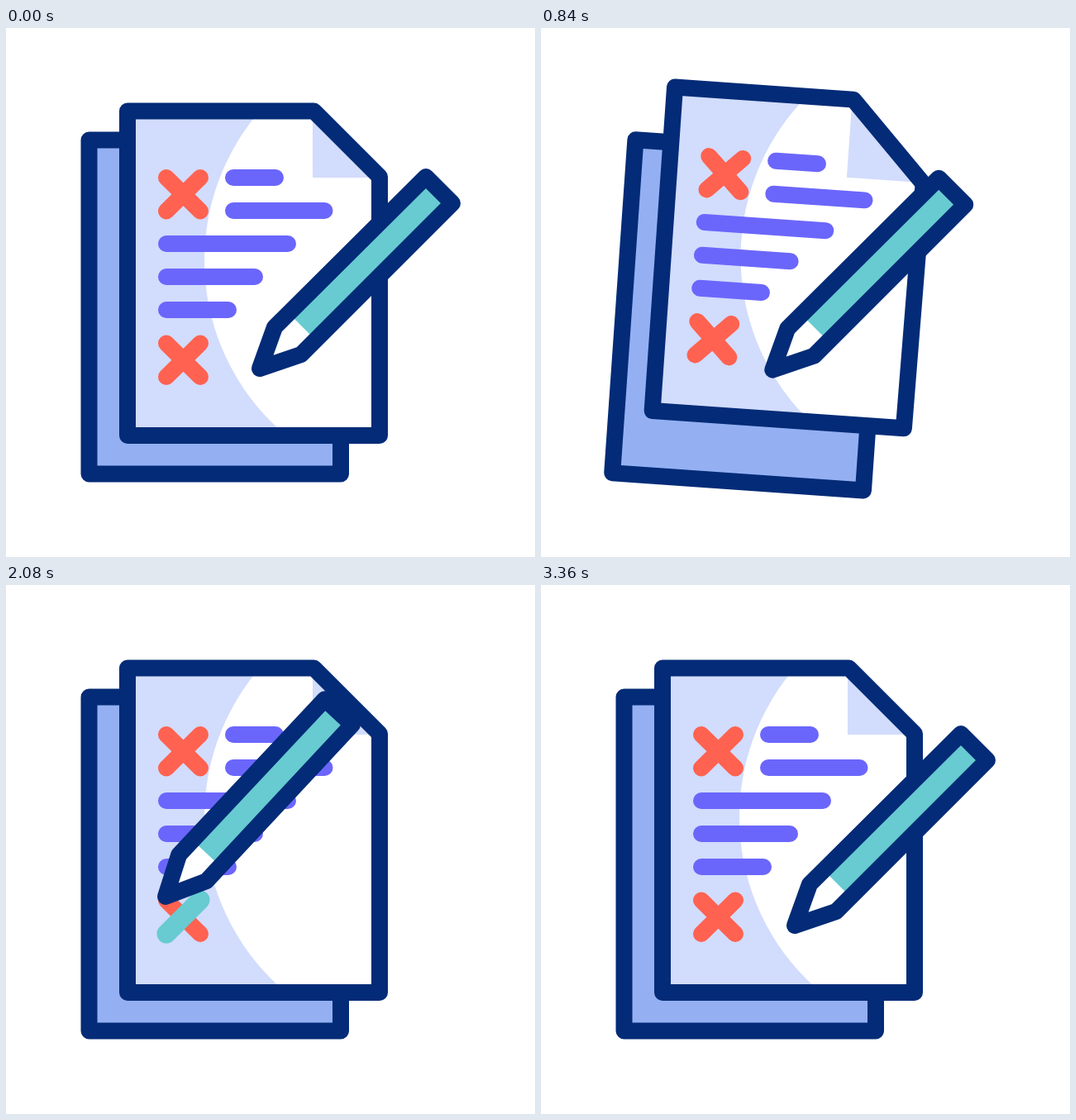
Write an HTML page with a canvas that moves like this. It is 640x640 px and loops after 3.56 s.

```html
<!DOCTYPE html>
<html lang="en">
<head>
<meta charset="utf-8">
<title>Correcting papers</title>
<style>
  html, body { margin: 0; width: 100%; height: 100%; overflow: hidden; background: #fff; }
  canvas { display: block; width: 640px; height: 640px; }
</style>
</head>
<body>
<canvas id="stage" width="640" height="640"></canvas>
<script>
const ctx = document.getElementById('stage').getContext('2d');
const LOOP = 3560, STEP = 40, REST = 3360;
const NAVY = '#032b77', BLUE = '#94b0f2', PALE = '#d2dcfc', VIOLET = '#6b66fb',
      RED = '#ff6250', TEAL = '#67cbd1', WHITE = '#fff';

const progress = (t, begin, end) => Math.min(1, Math.max(0, (t - begin) / (end - begin)));
const ease = (t, begin, end) => (1 - Math.cos(Math.PI * progress(t, begin, end))) / 2;
const pulse = (t, begin, end) => Math.sin(Math.PI * progress(t, begin, end));
const wave = (t, begin, end) => Math.sin(2 * Math.PI * progress(t, begin, end));
const mix = (a, b, u) => a.map((v, i) => v + (b[i] - v) * u);

// Sheets: tilt, slide past each other, then settle.
const tiltAt = t => 4 * (ease(t, 0, 560) - ease(t, 840, 1120)) + 2 * pulse(t, 1120, 1456);
const shuffleAt = t => -18.5 * wave(t, 560, 1400);
const liftAt = t => pulse(t, 1120, 1680) - 4 * pulse(t, 840, 1400);
const foldAt = t => ease(t, 0, 560) - ease(t, 840, 1540);

// Pencil: approach, first stroke, hop, second stroke, return.
const HOME = [307, 412];
const moves = [
  { begin: 650, end: 1240, to: [193, 419] },
  { begin: 1260, end: 1700, to: [240, 374] },
  { begin: 1720, end: 2080, to: [193, 377] },
  { begin: 2080, end: 2440, to: [239, 423] },
  { begin: 2600, end: 3020, to: HOME }
];
const tipAt = t => moves.reduce((tip, m) => mix(tip, m.to, ease(t, m.begin, m.end)), HOME);

function leanAt(t) {
  const held = ease(t, 1120, 1400) - ease(t, 2600, REST);
  const swing = wave(t, 2600, REST) * (1 - progress(t, 2600, REST));
  return 1.1 * pulse(t, 840, 1400) - 2 * held - 6.1 * swing;
}

// Each stroke grows with its pencil move and is later wiped from its start.
const strokes = [
  { from: [194, 422], to: [235, 381], draw: moves[1], wipe: { begin: 2600, end: 3180 } },
  { from: [194, 381], to: [235, 422], draw: moves[3], wipe: { begin: 2960, end: REST } }
];

function polygon(points) {
  ctx.beginPath();
  points.forEach(p => ctx.lineTo(...p));
  ctx.closePath();
}

function fill(color, points) {
  polygon(points);
  ctx.fillStyle = color;
  ctx.fill();
}

function outline(points) {
  polygon(points);
  ctx.strokeStyle = NAVY;
  ctx.lineWidth = 20;
  ctx.stroke();
}

function line(color, from, to, width = 20) {
  ctx.beginPath();
  ctx.moveTo(...from);
  ctx.lineTo(...to);
  ctx.strokeStyle = color;
  ctx.lineWidth = width;
  ctx.stroke();
}

function cross(y) {
  line(RED, [194, y], [235, y + 40.5]);
  line(RED, [194, y + 40.5], [235, y]);
}

function turned([x, y], degrees, dx, dy, draw) {
  ctx.save();
  ctx.translate(x + dx, y + dy);
  ctx.rotate(degrees * Math.PI / 180);
  ctx.translate(-x, -y);
  draw();
  ctx.restore();
}

function drawBackSheet() {
  const page = [[100.5, 135.5], [405, 135.5], [405, 539.5], [100.5, 539.5]];
  fill(BLUE, page);
  outline(page);
}

function drawFrontSheet(t) {
  const k = foldAt(t), foldX = 371 - 9 * k, foldY = 181 + 14 * k;
  const page = [[147, 100.5], [foldX + 1.5, 100.5], [452 + 3 * k, 180 + 16 * k],
                [452, 493], [147, 493]];
  ctx.save();
  fill(PALE, page);
  ctx.clip();
  ctx.beginPath();
  ctx.arc(517, 281, 277, 0, 2 * Math.PI);
  ctx.fillStyle = WHITE;
  ctx.fill();
  fill(PALE, [[foldX, 100], [foldX, foldY], [460, foldY], [460, 100]]);
  ctx.restore();
  outline(page);

  [326, 385.5, 341, 301, 269].forEach((right, row) => {
    const y = 181 + 40 * row;
    line(VIOLET, [row < 2 ? 275 : 194, y], [right, y]);
  });
  cross(181);
  cross(381.5);

  for (const { from, to, draw, wipe } of strokes) {
    const start = ease(t, wipe.begin, wipe.end), end = ease(t, draw.begin, draw.end);
    if (end > start) line(TEAL, mix(from, to, start), mix(from, to, end), 23);
  }
}

function drawPencil() {
  const body = [HOME, [325, 362], [508, 180], [540, 212], [357, 395]];
  fill(WHITE, body);
  fill(TEAL, [[341, 344], [508, 180], [540, 212], [375, 378]]);
  outline(body);
}

function render(t) {
  ctx.fillStyle = WHITE;
  ctx.fillRect(0, 0, 640, 640);
  ctx.lineCap = ctx.lineJoin = 'round';
  const tilt = tiltAt(t), shuffle = shuffleAt(t), lift = liftAt(t), tip = tipAt(t);
  turned([340, 326], tilt, 0, lift - shuffle, drawBackSheet);
  turned([340, 309], tilt, 0, lift + shuffle, () => drawFrontSheet(t));
  turned(HOME, leanAt(t), tip[0] - HOME[0], tip[1] - HOME[1], drawPencil);
}

const began = performance.now();
function tick() {
  const t = (performance.now() - began) % LOOP;
  render(Math.min(REST, Math.floor(t / STEP) * STEP));
  requestAnimationFrame(tick);
}
tick();
</script>
</body>
</html>
```
